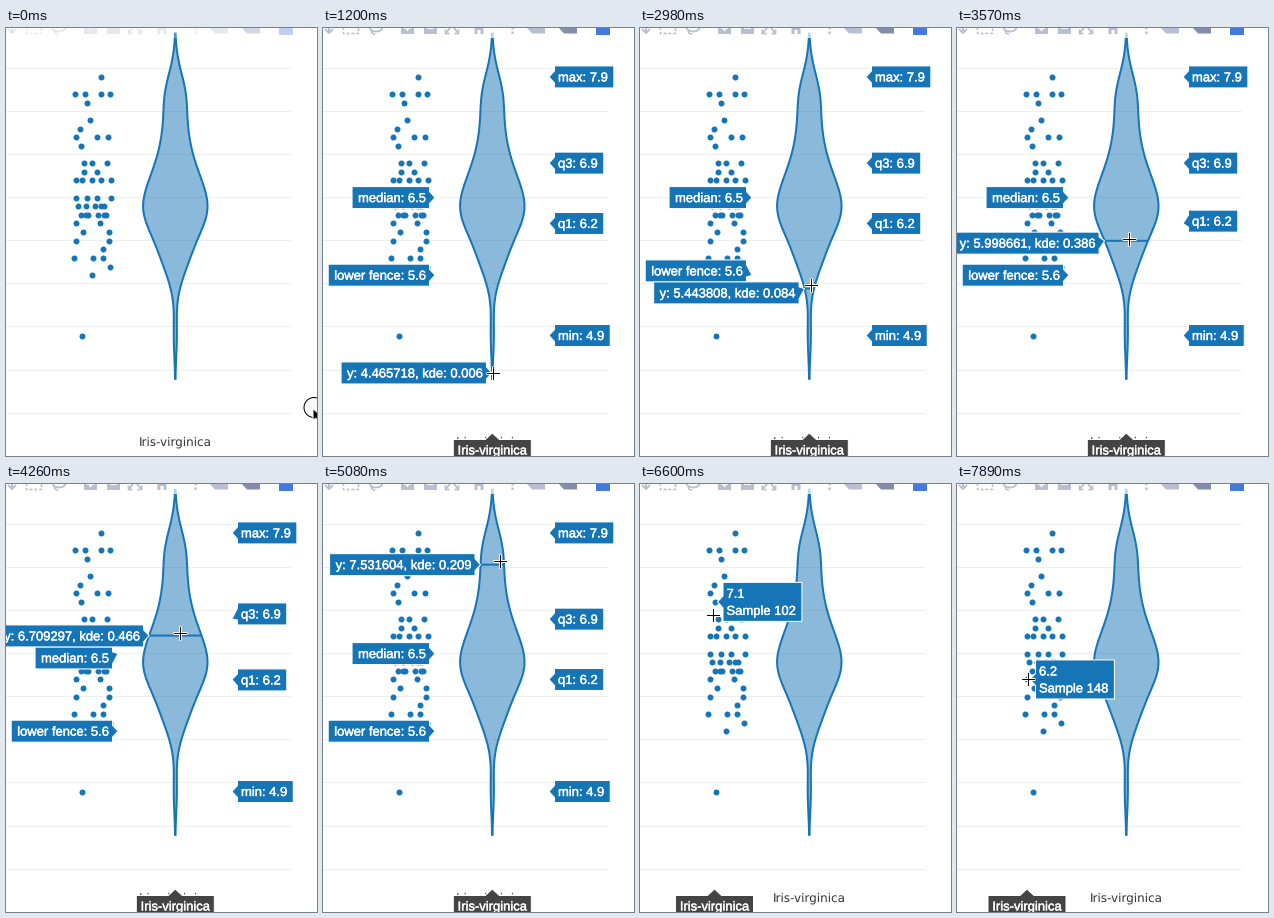
Write a matplotlib script that moves like this. It is 311 px wide and 428 px high and loops after 8000 ms.

```python
import numpy as np
import matplotlib.pyplot as plt
from matplotlib.animation import FuncAnimation
from matplotlib.patches import Circle, Polygon, Rectangle
from matplotlib.patheffects import withStroke

plt.rcParams["text.hinting"] = "no_hinting"

W, H, DPI = 311, 428, 64
PX = 72 / DPI
LOOP, STEP = 8000, 40
BLUE, DARK = "#1675b6", "#444444"
ICON, ICON_ON, BADGE = "#b9bed3", "#858bab", "#447adb"

# Dots per 0.1 step from 5.6 to 7.9, plus one outlier at 4.9
COUNTS = [1, 1, 3, 1, 2, 2, 2, 6, 5, 4, 0, 5, 2, 3, 0, 1, 3, 1, 1, 0, 1, 4, 0, 1]
VALUES = np.repeat(np.r_[4.9, np.arange(56, 80) / 10], [1] + COUNTS)
BANDWIDTH, DENSITY_SCALE = 0.2513, 0.8575
VIOLIN_X, VIOLIN_HALF = 169.3, 32.2

STATS = [("max", 7.9, 1), ("q3", 6.9, 1), ("median", 6.5, -1),
         ("q1", 6.2, 1), ("lower fence", 5.6, -1), ("min", 4.9, 1)]

# Pointer keys (time, x, y), violin hover keys (time, value),
# and dots hovered from a given time (time, value, x, sample)
POINTER = np.array([
    (720, 304, 372), (1080, 178, 345), (1200, 170, 345), (1790, 170, 345),
    (2490, 170, 294), (3570, 172, 211), (5080, 177, 77), (5440, 172, 55),
    (5900, 92, 100), (6480, 76, 120), (6600, 73, 131), (7890, 71, 195)])
HOVER = np.array([(1790, 4.465718), (2490, 4.999925), (3570, 5.998661),
                  (5080, 7.531604), (5440, 7.80)])
DOT_STOPS = [(5900, 7.2, 91, 125), (6360, 7.1, 74.5, 102), (6830, 6.9, 78, 120),
             (7180, 6.5, 69.5, 104), (7530, 6.3, 75, 123), (7770, 6.2, 70, 148)]

# The picture only updates at these times, in bursts of seven steps
BURSTS = (1910, 2740, 3570, 4500, 5320, 6130, 6950, 7770)
TICKS = np.r_[0, 120, 720:1201:120,
              np.concatenate([np.linspace(s, s + 700, 7) for s in BURSTS])].round(-1)


def y_of(value):
    return 40.3 + (8 - value) * 86.2


def density(v):
    u = (np.atleast_1d(v)[:, None] - VALUES) / BANDWIDTH
    total = np.exp(-u * u / 2).sum(axis=1)
    return DENSITY_SCALE * total / (len(VALUES) * BANDWIDTH * np.sqrt(2 * np.pi))


GRID_V = np.linspace(VALUES.min() - 2 * BANDWIDTH, VALUES.max() + 2 * BANDWIDTH, 240)
PEAK = density(GRID_V).max()


def half_width(v):
    return VIOLIN_HALF * density(v) / PEAK


def jittered_x():
    """Spread each row of dots at random, pinning the ones that matter."""
    rng = np.random.default_rng(4)
    pinned = {v: x for _, v, x, _ in DOT_STOPS} | {4.9: 76, 7.9: 94.5}
    xs = []
    for v, n in zip(*np.unique(VALUES, return_counts=True)):
        row = 67 + 38 * (np.arange(n) + rng.random(n)) / n
        if v in pinned:
            row[abs(row - pinned[v]).argmin()] = pinned[v]
        xs.extend(row)
    return xs


def pointer_at(t):
    return [np.interp(t, POINTER[:, 0], POINTER[:, k]) for k in (1, 2)]


def spread(ys, gap=22):
    """Push label centres apart until none overlap."""
    ys = np.array(ys, float)
    order = np.argsort(ys)
    for _ in range(40):
        for a, b in zip(order, order[1:]):
            push = max(0, gap - (ys[b] - ys[a])) / 2
            ys[a] -= push
            ys[b] += push
    return ys


fig = plt.figure(figsize=(W / DPI, H / DPI), dpi=DPI, facecolor="white")
ax = fig.add_axes([0, 0, 1, 1])
ax.set(xlim=(0, W), ylim=(H, 0))
ax.axis("off")
moving = []


def keep(artist):
    moving.append(artist)
    return artist


def shape(points, z, fc, ec="none", lw=0.0, alpha=None):
    return ax.add_patch(Polygon(points, closed=True, fc=fc, ec=ec, lw=lw * PX,
                                zorder=z, alpha=alpha, joinstyle="miter", snap=False))


def box(x, y, w, h, z, fc):
    return ax.add_patch(Rectangle((x, y), w, h, fc=fc, lw=0, zorder=z))


def line(xs, ys, color, width, z, **kw):
    return ax.plot(xs, ys, color=color, lw=width * PX, zorder=z, snap=False,
                   solid_capstyle="butt", **kw)[0]


def label_text(x, baseline, text, ha, z):
    return keep(ax.text(x, baseline, text, color="white", size=13 * PX, ha=ha,
                        va="baseline", family="Liberation Sans", zorder=z,
                        path_effects=[withStroke(linewidth=0.4, foreground="white")]))


def tag(lines, tip, y, side, z, centre=None):
    """Hover label whose arrow points at (tip, y); side is 1 for right of it."""
    c = y if centre is None else centre
    n = len(lines)
    half = (17 * n + 5) / 2
    texts = [label_text(tip + 9 * side, c + 4.5 + 17 * (i - (n - 1) / 2), s,
                        "left" if side > 0 else "right", z + 0.2)
             for i, s in enumerate(lines)]
    width = max(t.get_window_extent().width for t in texts) + 9.5
    inner, outer = tip + 5.5 * side, tip + (5.5 + width) * side
    keep(shape([(tip, y), (inner, c - 6), (inner, c - half), (outer, c - half),
                (outer, c + half), (inner, c + half), (inner, c + 6)],
               z, BLUE, "white", 1))


def axis_tag(x):
    half, top = 39, 411.5
    keep(shape([(x, 405), (x + 7, top), (x + half, top), (x + half, 433),
                (x - half, 433), (x - half, top), (x - 7, top)],
               6, DARK, "white", 1))
    label_text(x, 426.5, "Iris-virginica", "center", 6.2)


def crosshair(x, y):
    x, y = round(x) + 0.5, round(y) + 0.5
    for color, width, r in (("white", 3, 7), ("black", 1, 6.5)):
        keep(line([x - r, x + r], [y, y], color, width, 11))
        keep(line([x, x], [y - r, y + r], color, width, 11))


def arrow(x, y):
    outline = [(0, 0), (0, 12), (2.8, 9.5), (4.8, 14), (7, 13), (5, 8.7), (9, 8.5)]
    keep(shape([(x + a, y + b) for a, b in outline], 11, "black", "white", 1))


def build_toolbar():
    parts = [line([2, 6, 10], [1, 5, 1], ICON, 2, 2),
             line([6, 6], [-3, 5], ICON, 2, 2),
             line([20.5, 20.5, 35.5, 35.5], [-2, 5.5, 5.5, -2], ICON, 1.6, 2,
                  dashes=(1.8, 1.2))]
    a = np.linspace(-0.3, np.pi + 0.3, 20)
    parts.append(line(53 + 6.5 * np.cos(a), -1 + 4.5 * np.sin(a), ICON, 1.8, 2))
    parts.append(line([48, 49, 52], [2, 5, 6.5], ICON, 1.5, 2))
    for x in (78, 101):
        parts.append(box(x, -7, 13, 13, 2, ICON))
        parts.append(line([x + 3, x + 10], [0, 0], "white", 2, 2.1))
    parts.append(line([84.5, 84.5], [-4, 3], "white", 2, 2.1))
    for s in (-1, 1):
        parts.append(line([129 + 2 * s, 129 + 6 * s], [0, 4.5], ICON, 1.8, 2))
        parts.append(line([129 + 2.5 * s, 129 + 6.5 * s, 129 + 6.5 * s],
                          [5.5, 5.5, 1.5], ICON, 1.8, 2))
    parts.append(shape([(150, 0), (156, -6), (162, 0), (160.5, 0), (160.5, 6),
                        (157.5, 6), (157.5, 2), (154.5, 2), (154.5, 6),
                        (151.5, 6), (151.5, 0)], 2, ICON))
    for y0, y1 in ((-4, 1.5), (3.5, 6)):
        parts.append(line([189.5, 189.5], [y0, y1], ICON, 2.2, 2))
    for x, color in ((204, ICON), (236, ICON_ON)):
        parts.append(shape([(x, 0), (x + 5, -5), (x + 18, -5), (x + 18, 5.5),
                            (x + 5, 5.5)], 2, color))
    parts.append(box(273, -7, 14, 14, 2, BADGE))
    return parts


for k in range(9):
    y = int(40.1 + 43.13 * k) + 0.5
    line([0, 285], [y, y], "#eeeeee", 1, 0)

widths = half_width(GRID_V)
outline = np.column_stack([np.r_[VIOLIN_X - widths, VIOLIN_X + widths[::-1]],
                           np.r_[y_of(GRID_V), y_of(GRID_V[::-1])]])
shape(outline, 1, BLUE, alpha=0.5)
shape(outline, 1.5, "none", BLUE, 2)
ax.scatter(jittered_x(), y_of(VALUES), s=(6 * PX) ** 2, color=BLUE, lw=0,
           zorder=1.6, snap=False)
ax.text(VIOLIN_X, 418, "Iris-virginica", color="#333333", size=12 * PX, ha="center",
        va="baseline", family="DejaVu Sans", zorder=3)
toolbar_back = box(0, 0, 292, 10, 1.8, "white")
toolbar = build_toolbar()


def violin_hover(t):
    value = np.interp(t, HOVER[:, 0], HOVER[:, 1])
    half, kde = half_width(value)[0], density(value)[0]
    y = y_of(value)
    keep(line([VIOLIN_X - half, VIOLIN_X + half], [y, y], BLUE, 2, 4))
    centres = spread([y_of(v) for _, v, _ in STATS] + [y])
    for (name, v, side), c in zip(STATS, centres):
        tag([f"{name}: {v:.1f}"], 226 if side > 0 else 112, y_of(v), side, 6, c)
    tag([f"y: {value:.6f}, kde: {kde:.3f}"], VIOLIN_X - half, y, -1, 8, centres[-1])
    axis_tag(VIOLIN_X)


def dot_hover(t):
    reached = [stop for stop in DOT_STOPS if stop[0] <= t]
    if reached:
        _, value, x, sample = reached[-1]
        tag([f"{value:.1f}", f"Sample {sample}"], x + 3, y_of(value), 1, 8)
        axis_tag(x)


def draw(frame):
    while moving:
        moving.pop().remove()
    t = TICKS[TICKS <= frame * STEP + 35].max()

    opacity = 0.35 if t < 120 else 0 if t < 720 else 0.45 if t < 840 else 1
    toolbar_back.set_alpha(0.7 * opacity)
    for part in toolbar:
        part.set_alpha(opacity)

    if t < 120:
        keep(ax.add_patch(Circle((308, 379.5), 10, fc="#fafafa", ec="black",
                                 lw=PX, zorder=10)))
        arrow(307, 380.5)
    elif t >= 720:
        x, y = pointer_at(t)
        if 1080 <= t < 5660:
            violin_hover(t)
        else:
            dot_hover(t)
        (arrow if x > 285 else crosshair)(x, y)
    return moving


anim = FuncAnimation(fig, draw, frames=LOOP // STEP, interval=STEP,
                     repeat=True, blit=False)
plt.show()
```
